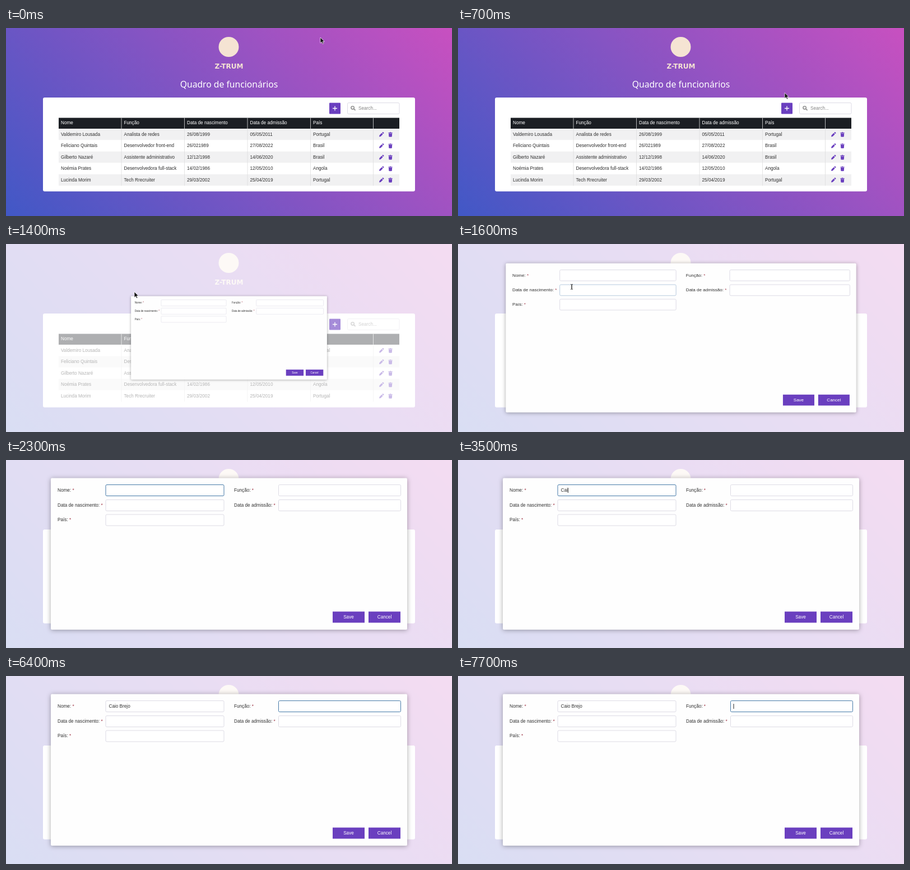
Write an HTML page that moves like this. It is 796 by 338 pixels and loops after 8 s.

```html
<!DOCTYPE html>
<html lang="pt">
<head>
<meta charset="utf-8">
<title>Quadro de funcionários</title>
<style>
  html, body { margin: 0; width: 100%; height: 100%; overflow: hidden; }
  svg {
    display: block; width: 796px; height: 338px;
    background: linear-gradient(45deg, #4158c6, #c850c0);
    font: 8.2px "Liberation Sans", Arial, sans-serif;
  }
  text { fill: #303030; white-space: pre; }
  .light { fill: #fff; }
  .purple { fill: #6a3fbf; }
  .field { fill: #fff; stroke: #dddbe5; }
  .field.hover { stroke: #b5c9de; }
  .field.focus { stroke: #4479a8; }
  .window { fill: #fefefe; filter: drop-shadow(0 1px 4px #0005); }
  #title { font: 500 15.7px "Noto Sans", sans-serif; }
  #brand { font: bold 12px "DejaVu Sans", sans-serif; fill: #f5e4d3; }
  #add.disabled rect { fill: #e6e6e6; stroke: #dadada; }
  #add.disabled path { stroke: #f6f6f6; }
</style>
</head>
<body>
<svg id="stage" viewBox="0 0 796 338"></svg>
<script>
const LOOP = 8000, CLICK = 1000, OPEN = 1400, POP = 300;
const COLUMNS = [94, 206.5, 319, 431.5, 544, 656];
const ROWS = [
  ["Valdemiro Lousada", "Analista de redes", "26/08/1999", "05/05/2011", "Portugal"],
  ["Feliciano Quintais", "Desenvolvedor front-end", "26/021989", "27/08/2022", "Brasil"],
  ["Gilberto Nazaré", "Assistente administrativo", "12/12/1998", "14/06/2020", "Brasil"],
  ["Noémia Prates", "Desenvolvedora full-stack", "14/02/1986", "12/05/2010", "Angola"],
  ["Lucinda Morim", "Tech Rrecruiter", "29/03/2002", "25/04/2019", "Portugal"]
];
const HEADINGS = ["Nome", "Função", "Data de nascimento", "Data de admissão", "País"];
const NAME = "Caio Brejo";
const KEY_TIMES = [3100, 3300, 3500, 3900, 4100, 4300, 4400, 4500, 4700, 4800];
// time, x, y
const POINTER = [
  [100, 561, 17], [500, 580, 90], [900, 586, 143], [1000, 586, 143],
  [1300, 291, 100], [1400, 229, 86], [1600, 203, 77], [1900, 194, 60], [2300, 190, 55]
];

const text = (x, y, s, extra = "") => `<text x="${x}" y="${y}" ${extra}>${s}</text>`;
const rect = (x, y, w, h, extra = "") =>
  `<rect x="${x}" y="${y}" width="${w}" height="${h}" ${extra}/>`;
const centred = 'text-anchor="middle"';

const cells = (values, y, extra) =>
  values.map((s, i) => text(COLUMNS[i] + 4, y, s, extra)).join("");

const rowIcons = y => `<g class="purple" transform="translate(0 ${y})">
  <path d="M666 4l.6-2.8 3.9-3.9 2.2 2.2-3.9 3.9zM671.2-3.3l1-1q.6-.4 1.1 0l1 1q.5.6 0 1.1l-1 1z"/>
  <path d="M682.4-3.6h2.1l.6-.7h1.9l.6.7h2.1v1.1h-7.3zM682.9-1.9h6.3l-.4 5.4q-.1.8-.9.8h-3.7q-.8 0-.9-.8z"/></g>`;

const row = (values, i) => {
  const y = 191 + i * 20.5;
  return rect(94, y - 10, 608, 20.5, 'class="stripe"') + cells(values, y + 2.7) + rowIcons(y + .5);
};

const field = (label, x, y, fx, w, id) =>
  text(x, y + 12.8, `${label}: <tspan fill="#a03848">*</tspan>`) +
  rect(fx + .5, y + .5, w, 20, `class="field" rx="2" id="${id}"`);

const button = (label, x) =>
  rect(x, 272.5, 57, 20, 'class="purple"') + text(x + 28.5, 285, label, `class="light" ${centred}`);

stage.innerHTML = `
  <circle cx="397.5" cy="34" r="18" fill="#f5e4d3"/>
  ${text(398, 73, "Z-TRUM", `id="brand" ${centred}`)}
  ${text(398, 106.5, "Quadro de funcionários", `id="title" class="light" ${centred}`)}
  ${rect(0, 0, 796, 338, 'id="shade" fill="#fff" opacity=".8"')}
  ${rect(66, 125, 664, 168.7, 'rx="3" fill="#fff"')}
  <g id="add">
    ${rect(577, 134.5, 20, 20, 'class="purple" rx="1"')}
    <path d="M583 144.5h8M587 140.5v8" stroke="#fff" stroke-width="1.3"/>
  </g>
  <g id="grid">
    ${rect(609.5, 134.5, 92.5, 20, 'class="field" rx="2"')}
    <path d="M621 145.5l2.5 2.5" stroke="#858585" stroke-width="1.7"/>
    <circle cx="618.6" cy="143.3" r="2.7" fill="none" stroke="#858585" stroke-width="1.4"/>
    ${text(629, 146.6, "Search...", 'fill-opacity=".6"')}
    ${ROWS.map(row).join("")}
    ${rect(94, 161.5, 608, 19.5, 'fill="#1b1e23"')}
    ${cells(HEADINGS, 173.4, 'class="light"')}
    <path d="${COLUMNS.slice(1).map(x => `M${x - .5} 161.5v122`).join("")}" stroke="#ddd" stroke-width=".8"/>
  </g>
  <g id="popup">
    ${rect(80, 32.5, 636, 272.5, 'class="window" rx="2"')}
    ${field("Nome", 92, 44, 177.5, 211, "nameField")}
    ${field("Função", 407, 44, 486, 218, "roleField")}
    ${field("Data de nascimento", 92, 71, 177.5, 211, "birthField")}
    ${field("Data de admissão", 407, 71, 486, 218, "hireField")}
    ${field("País", 92, 97.5, 177.5, 211, "countryField")}
    ${button("Save", 583)}${button("Cancel", 647)}
    ${text(183.5, 57.3, "", 'id="typed"')}
    ${rect(0, 50, 1, 9, 'id="caret" fill="#222"')}
  </g>
  <g id="pointer" stroke-linejoin="round">
    <path id="arrow" d="M0 0v10.2l2.4-2.2 1.7 3.6 1.7-.8-1.6-3.5h3.2z" fill="#111" stroke="#fff" stroke-width=".7"/>
    <path id="hand" d="M-1 0q1-1 1.8 0v3.6l3.6.9q1.2.4 1 1.7l-.6 3.2h-4.9l-3.2-3.9q.6-1.2 2.3.4z" fill="#fff" stroke="#222" stroke-width=".9"/>
    <path id="beam" d="M-2-4.5q2 0 2 1v7q0 1-2 1M2-4.5q-2 0-2 1v7q0 1 2 1" fill="none" stroke="#222" stroke-width=".9"/>
  </g>`;

const $ = id => document.getElementById(id);
const show = (id, on) => $(id).style.display = on ? "" : "none";
const within = (t, from, to) => t >= from && t < to;
const stripes = [...document.querySelectorAll(".stripe")];

function pointerAt(t) {
  const next = POINTER.findIndex(p => p[0] > t);
  if (next < 0) return POINTER.at(-1).slice(1);
  if (next === 0) return POINTER[0].slice(1);
  const [t0, x0, y0] = POINTER[next - 1], [t1, x1, y1] = POINTER[next];
  const p = (t - t0) / (t1 - t0);
  return [x0 + (x1 - x0) * p, y0 + (y1 - y0) * p];
}

function draw(t) {
  const open = t >= OPEN, clicked = t >= CLICK;
  show("shade", open);
  $("grid").setAttribute("opacity", open ? .35 : 1);
  $("add").setAttribute("opacity", open ? .6 : 1);
  $("add").classList.toggle("disabled", clicked && !open);
  stripes.forEach((s, i) => s.setAttribute("fill", i % 2 == clicked ? "#f1f1f2" : "#fff"));

  show("popup", open);
  const p = Math.min(1, Math.max(0, (t - OPEN) / POP));
  const scale = 1 - .45 * (1 - p) ** 3;
  $("popup").setAttribute("transform", `translate(398 168.7) scale(${scale}) translate(-398 -168.7)`);

  const onRole = t >= 6400;
  $("nameField").classList.toggle("focus", t >= 1800 && !onRole);
  $("roleField").classList.toggle("focus", onRole);
  $("birthField").classList.toggle("hover", within(t, 1600, 1800));
  $("typed").textContent = NAME.slice(0, KEY_TIMES.filter(k => k <= t).length);
  $("caret").setAttribute("x", onRole ? 491.5 : 183.5 + $("typed").getComputedTextLength());
  show("caret", within(t, 2900, 5400) || within(t, 6000, 6400) || within(t, 6500, 7100) || t >= 7700);

  const [x, y] = pointerAt(t);
  const hand = within(t, 800, OPEN), beam = t >= 1600;
  $("pointer").setAttribute("transform", `translate(${x} ${y})`);
  show("pointer", t < 2300);
  show("arrow", !hand && !beam);
  show("hand", hand);
  show("beam", beam);
}

function tick(now) {
  draw(Math.floor(now % LOOP / 100) * 100);
  requestAnimationFrame(tick);
}
draw(0);
requestAnimationFrame(tick);
</script>
</body>
</html>
```
